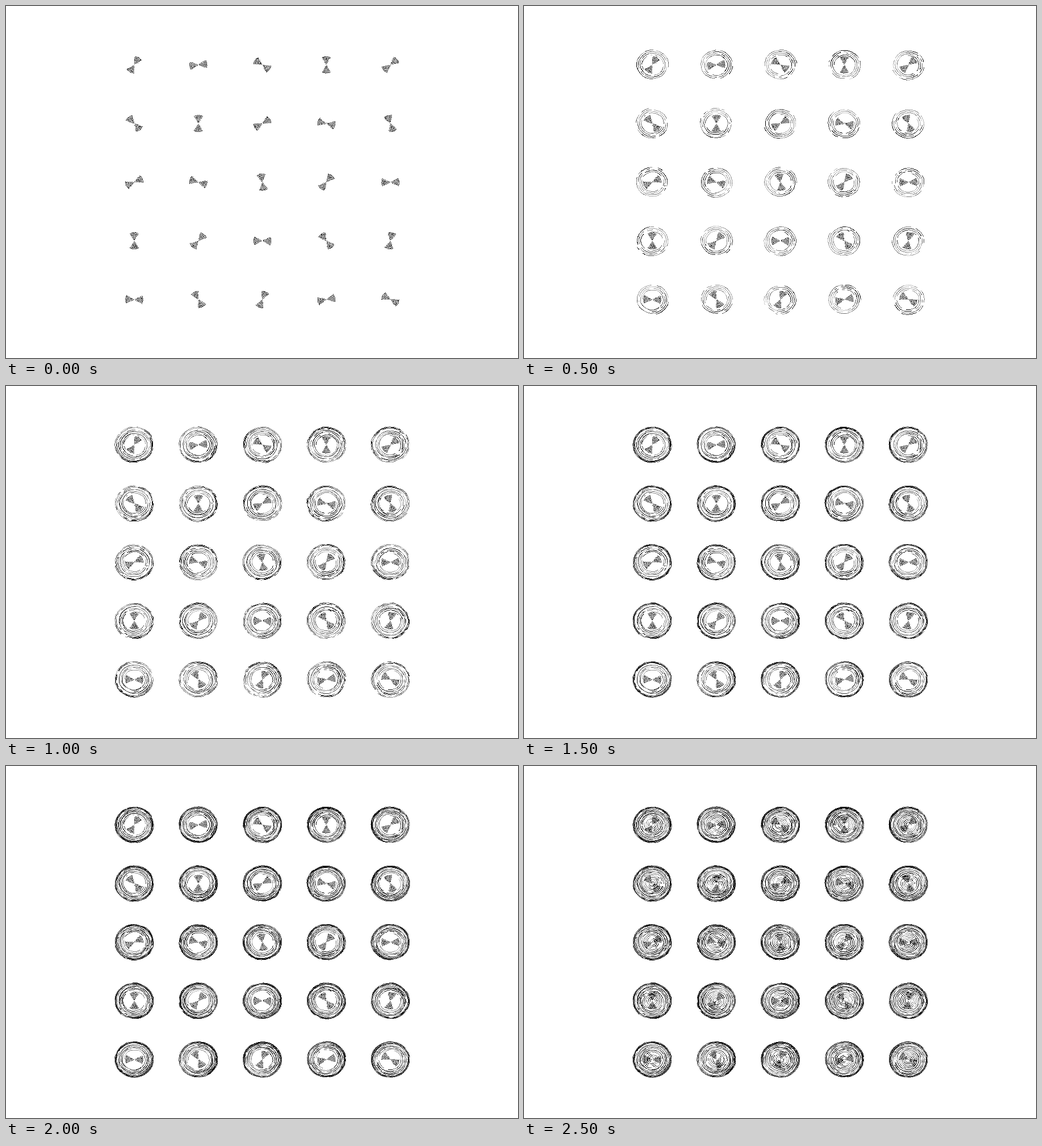
Write an HTML page with a canvas that moves like this. It is 902x621 px and loops after 3 s.

```html
<!DOCTYPE html>
<html lang="en">
<head>
<meta charset="utf-8">
<title>Ink discs</title>
<style>
  html, body { margin: 0; width: 100%; height: 100%; overflow: hidden; background: #fff; }
  canvas { display: block; }
</style>
</head>
<body>
<canvas id="stage" width="902" height="621"></canvas>
<script>
const ctx = document.getElementById('stage').getContext('2d');
const LOOP = 3000, STEP = 500, TAU = Math.PI * 2;

// Tilt of each bow in degrees, row by row.
const tilts = [
  [-60, -6, 36, 90, -40],
  [50, 92, -29, 14, 72],
  [-24, 18, 82, -50, 0],
  [90, -48, 2, 54, -78],
  [4, 63, -68, -11, 29]
];

// Spirals added at each step: inner radius, outer radius, turns, ink.
const layers = [
  [],
  [[17.7, 29, 3.7, .62]],
  [[20, 30, 2, .45], [30.5, 34.4, 3, .62]],
  [[31.5, 34.4, 3, .5]],
  [[22, 32, 4, .46], [31, 34.3, 1.5, .45]],
  [[3.5, 20.5, 6, .68]]
];

function seeded(seed) {
  let s = seed * 2654435761 >>> 0;
  return () => {
    s = s + 0x6D2B79F5 >>> 0;
    let x = Math.imul(s ^ s >>> 15, s | 1);
    x ^= x + Math.imul(x ^ x >>> 7, x | 61);
    return ((x ^ x >>> 14) >>> 0) / 4294967296;
  };
}

function dot(x, y, alpha) {
  ctx.globalAlpha = Math.min(1, alpha);
  ctx.fillRect(Math.round(x - .5), Math.round(y - .5), 1, 1);
}

// Two facing wedges built from short arcs.
function bow(cx, cy, tilt, rnd) {
  for (const side of [0, Math.PI]) {
    for (let r = 1.5; r < 16; r += 1.95) {
      const from = -.45 - rnd() * .07, to = .45 + rnd() * .07;
      for (let a = from; a < to; a += .8 / r) {
        const angle = tilt + side + a;
        const rr = r + (rnd() - .5) * .5;
        dot(cx + rr * Math.cos(angle), cy + rr * .95 * Math.sin(angle), .55 + rnd() * .45);
      }
    }
  }
}

// A broken pen line winding outwards, darker on one side.
function spiral(cx, cy, [r0, r1, turns, ink], rnd) {
  const start = rnd() * TAU, dark = rnd() * TAU, wave = rnd() * TAU;
  let run = 0, tone = 1;
  for (let a = 0; a < turns * TAU;) {
    const r = r0 + (r1 - r0) * a / (turns * TAU);
    if (--run < 0) {
      run = 2 + rnd() * 7;
      tone = rnd() < .14 ? 0 : .45 + rnd() * .95;
    }
    const angle = start + a;
    const rr = Math.min(34.5, r + .3 * Math.sin(5 * angle + wave));
    const shade = ink * tone * (1 + .4 * Math.cos(angle - dark));
    if (tone) dot(cx + rr * Math.cos(angle), cy + rr * .925 * Math.sin(angle), shade);
    a += 1 / r;
  }
}

function draw(step) {
  ctx.clearRect(0, 0, 902, 621);
  ctx.fillStyle = '#000';
  tilts.forEach((row, j) => row.forEach((deg, i) => {
    const cx = 226 + i * 112.8, cy = 103.8 + j * 103.5;
    const rnd = seeded(j * 5 + i + 1);
    bow(cx, cy, deg * TAU / 360, rnd);
    for (let k = 1; k <= step; k++) {
      for (const line of layers[k]) spiral(cx, cy, line, rnd);
    }
  }));
}

let shown = -1;
function tick() {
  const step = Math.floor(performance.now() % LOOP / STEP);
  if (step !== shown) draw(shown = step);
  requestAnimationFrame(tick);
}
tick();
</script>
</body>
</html>
```
